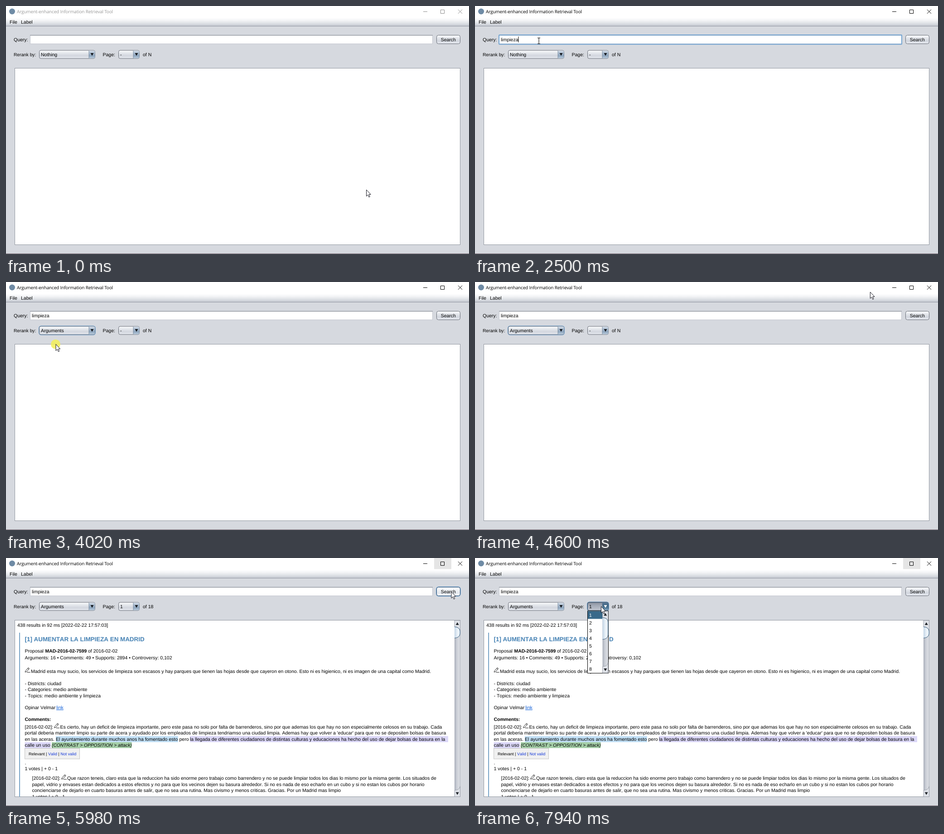
An HTML page for the animation above (8 s loop, 1022 px wide and 548 px high).

```html
<!DOCTYPE html>
<html lang="en">
<head>
<meta charset="utf-8">
<title>Retrieval tool</title>
<style>
html, body { margin: 0; width: 100%; height: 100%; overflow: hidden; background: #d6d9df; }
svg { display: block; width: 100vw; height: 100vh; }
text { font: 10.5px "Liberation Sans", Arial, sans-serif; font-kerning: none; text-rendering: geometricPrecision; white-space: pre; fill: #000; }
.title { font: 10px "Open Sans", "Noto Sans", sans-serif; letter-spacing: -.16px; }
.head { font-size: 13.4px; font-weight: bold; fill: #4682b4; }
.bold { font-weight: bold; }
.ital { font-style: italic; }
.small { font-size: 9px; }
.link { fill: #1160d8; text-decoration: underline; }
.act { fill: #1438d8; }
.inv { fill: #fff; }
.ring { fill: none; stroke: #73a4d1; stroke-width: 2; }
</style>
</head>
<body>
<svg id="stage" viewBox="0 0 1022 548" preserveAspectRatio="none"></svg>
<script>
const LOOP = 8000, QUERY = 'limpieza';
const KEYS = [1420, 1600, 1760, 1910, 2010, 2100, 2250, 2500];
const CLICKS = [[520, 620], [3270, 3400], [3970, 4080], [5090, 5180], [7820, 7940]];
const START = [795, 406];
const EDGE = '#686d77', EDGE_FOCUS = '#31506e';
// pointer strokes: start, end, control point, end point
const STROKES = [
  [40, 460, 420, 180, 141, 77],
  [2930, 3230, 140, 95, 130, 108],
  [3400, 3500, 129, 113, 126, 118],
  [3540, 3750, 121, 131, 109.5, 137.5],
  [4240, 4700, 560, 70, 970, 7],
  [4700, 4970, 1020, 36, 982.5, 74.5],
  [6870, 7350, 560, 140, 278, 107]
];

const txt = (x, y, s, a = '') => `<text x="${x}" y="${y}" ${a}>${s}</text>`;
const box = (x, y, w, h, fill, a = '') => `<rect x="${x}" y="${y}" width="${w}" height="${h}" fill="${fill}" ${a}/>`;
const path = (d, a) => `<path d="${d}" ${a}/>`;
const group = (id, s, a = '') => `<g id="${id}" ${a}>${s}</g>`;
const grad = (id, colors, across) => `<linearGradient id="${id}" x2="${across ? 1 : 0}" y2="${across ? 0 : 1}">` +
  colors.map((c, i) => `<stop offset="${i / (colors.length - 1)}" stop-color="${c}"/>`).join('') + '</linearGradient>';
const tri = (x, y, up, fill = '#1f2328') => path(`M${x - 3.5} ${y + (up ? 3 : -3)}h7l-3.5 ${up ? -6 : 6}z`, `fill="${fill}"`);
const ring = (id, x, y, w, h, r) => box(x, y, w, h, 'none', `id="${id}" class="ring" rx="${r}"`);
const pencil = (x, y) => path(`M${x + 2} ${y + 8.5}L${x + 8.3} ${y + 1.2}l2.3 2L${x + 4.6} ${y + 10.2}l-3.5 1zM${x + 7} ${y + 2.8}l2.3 2M${x + 5.2} ${y + 11.6}h7.3`,
  'fill="none" stroke="#222" stroke-width="1"');

function combo(id, x, w) {
  const face = (body, arrow, mark, edge) => {
    const r = x + w - 14;
    return box(x + .5, 98, w - 1, 18, `url(#${body})`, `rx="3.5" stroke="${edge}"`) +
      path(`M${r} 98.5h10.5q3 0 3 3v11q0 3-3 3H${r}z`, `fill="url(#${arrow})"`) +
      path(`M${r} 98.5v17`, 'stroke="#6c8196" stroke-width=".8"') +
      tri(x + w - 7, 107, false, mark);
  };
  return ring(id + 'Ring', x, 97.5, w, 19, 4.5) +
    face('face', 'arrow', '#15191e', EDGE) +
    group(id + 'Open', face('dark', 'arrowDark', '#fff', '#31465c')) +
    txt(x + 4, 111, '', `id="${id}Text"`);
}

function defs() {
  return '<defs>' +
    grad('face', ['#fbfcfd', '#e4e7ec', '#d2d6de', '#e9ecf2']) +
    grad('hover', ['#ffffff', '#f1f3f6', '#e4e8ee', '#fbfcff']) +
    grad('dark', ['#858d9b', '#a0a7b4', '#b0b6c2', '#c3c8d2']) +
    grad('arrow', ['#d5dee9', '#a9bbcf', '#8fa6be', '#b8cbdd']) +
    grad('arrowDark', ['#5d7c98', '#3f6584', '#507996', '#7fa3bf']) +
    grad('menu', ['#ffffff', '#f3f4f6', '#dfe2e7', '#c5c9d1']) +
    grad('track', ['#a9aeb9', '#c6cad3', '#d6d9df', '#d6d9df'], 1) +
    grad('thumb', ['#c3d5e6', '#dde8f2', '#f2f7fb', '#c9dae9'], 1) +
    `<clipPath id="pane">${box(20, 138, 970, 389.5, '#000')}</clipPath></defs>`;
}

function chrome() {
  return box(0, 0, 1022, 26, '#fff') +
    box(945, 0, 38, 24.5, '#e5e5e5', 'id="maxHover"') +
    '<circle cx="13.5" cy="12" r="6.5" fill="#6f8ba5"/>' +
    txt(24, 16, 'Argument-enhanced Information Retrieval Tool', 'id="title" class="title"') +
    group('winButtons', path('M921 12.5h9M959.5 8.5h8v8h-8zM998 7.8l9 9M1007 7.8l-9 9', 'fill="none" stroke-width="1"')) +
    box(0, 26, 1022, 18, 'url(#menu)') + box(0, 44, 1022, 1, '#9297a1') +
    txt(8, 39, 'File') + txt(33, 39, 'Label') +
    box(0, 547, 1022, 1, '#705e6b');
}

function form() {
  return txt(17, 78, 'Query:') +
    box(53.5, 64.5, 888, 19, '#fff', 'stroke="#c3c7cf"') +
    path('M53 64.5h889', 'stroke="#898e98"') + path('M54 65.5h887', 'stroke="#d8dade"') +
    ring('queryRing', 53, 64, 889, 20.5, 1) +
    txt(57, 78, '', 'id="query"') + box(57, 67.5, 1, 13, '#000', 'id="caret"') +
    ring('searchRing', 950, 64, 53, 20, 5) +
    box(950.5, 64.5, 52, 19, 'url(#face)', 'id="search" rx="4"') +
    txt(976.3, 78, 'Search', 'text-anchor="middle"') +
    txt(17, 111, 'Rerank by:', 'style="font-size:10.2px"') + combo('rank', 73, 124) +
    txt(213.5, 111, 'Page:') + combo('page', 248, 47) +
    txt(302, 111, '', 'id="total"') +
    box(19.5, 137.5, 983, 390, '#fff', 'stroke="#9297a1"');
}

function results() {
  const text =
    txt(25, 152, '438 results in 92 ms [2022-02-22 17:57:03]') +
    box(29, 165, 2, 363, '#7ba5c8') +
    txt(41.5, 184, '[1] AUMENTAR LA LIMPIEZA EN MADRID', 'class="head"') +
    txt(41.5, 209, 'Proposal') + txt(86.5, 209, 'MAD-2016-02-7599', 'class="bold" style="font-size:10.4px"') +
    txt(181, 209, 'of 2016-02-02') +
    txt(41.5, 224, 'Arguments: 16 • Comments: 49 • Supports: 2894 • Controversy: 0,102') +
    pencil(41, 241) +
    txt(55, 254, 'Madrid esta muy sucio, los servicios de limpieza son escasos y hay parques que tienen las hojas desde que cayeron en otono. Esto ni es higienico, ni es imagen de una capital como Madrid.') +
    txt(41.5, 281, '- Districts: ciudad') + txt(41.5, 294, '- Categories: medio ambiente') +
    txt(41.5, 308, '- Topics: medio ambiente y limpieza') +
    txt(41.5, 334, 'Opinar Velmar') + txt(111, 334, 'link', 'class="link"') +
    txt(41.5, 360, 'Comments:', 'class="bold"') +
    txt(41.5, 377, '[2016-02-02]:') + pencil(105.5, 364) +
    txt(119.5, 377, 'Es cierto, hay un deficit de limpieza importante, pero este pasa no solo por falta de barrenderos, sino por que ademas los que hay no son especialmente celosos en su trabajo. Cada') +
    txt(41.5, 390, 'portal deberia mantener limpio su parte de acera y ayudado por los empleados de limpieza tendriamso una ciudad limpia. Ademas hay que volver a \'educar\' para que no se depositen bolsas de basura') +
    box(110, 393.5, 270, 13.5, '#c2e0f6') + box(406, 393.5, 570, 13.5, '#dcd8f8') +
    box(41.5, 407, 57.5, 13, '#dcd8f8') + box(101, 407, 176.5, 13, '#a5cfa8') +
    txt(41.5, 404, 'en las aceras.') +
    txt(110, 404, 'El ayuntamiento durante muchos anos ha fomentado esto') + txt(382.5, 404, 'pero') +
    txt(406, 404, 'la llegada de diferentes ciudadanos de distintas culturas y educaciones ha hecho del uso de dejar bolsas de basura en la') +
    txt(41.5, 417, 'calle un uso') + txt(101, 417, '(CONTRAST &gt; OPPOSITION &gt; attack)', 'class="ital" style="font-size:10.2px"') +
    box(41.5, 420.5, 121, 23.5, '#f0f0f0', 'stroke="#c4c4c4"') +
    txt(50, 436, 'Relevant | <tspan class="act">Valid</tspan> | <tspan class="act">Not valid</tspan>', 'class="small"') +
    txt(41.5, 456, '.') + txt(41.5, 469, '1 votes | + 0 - 1') +
    txt(57.5, 490, '[2016-02-02]:') + pencil(121.5, 477.5) +
    txt(135, 490, 'Que razon teneis, claro esta que la reduccion ha sido enorme pero trabajo como barrendero y no se puede limpiar todos los dias lo mismo por la misma gente. Los situados de') +
    txt(57.5, 504, 'papel, vidrio y envases estan dedicados a estos efectos y no para que los vecinos dejen su basura alrededor. Si no es nada de eso echarlo en un cubo y si no estan los cubos por horario') +
    txt(57.5, 517, 'concienciarse de dejarlo en cuarto basuras antes de salir, que no sea una rutina. Mas civismo y menos criticas. Gracias. Por un Madrid mas limpio') +
    txt(57.5, 531, '1 votes | + 0 - 1');
  return group('results', `<g clip-path="url(#pane)">${text}</g>` + scrollbar(990, 138, 12.5, 389.5, 14, 177));
}

// the arrow buttons and the thumb meet along curves that bulge to the right
function scrollbar(x, y, w, h, btn, end) {
  const c = x + w / 2, r = x + w, top = y + btn, low = y + h - btn;
  const line = 'stroke="#8d929c" stroke-width=".8"';
  return box(x, y, w, h, 'url(#track)') +
    path(`M${x} ${y}H${r}V${top + 9}Q${r - 1} ${top + 1} ${x} ${top}z`, `fill="#dfe2e8" ${line}`) +
    path(`M${x} ${y + h}H${r}V${low - 9}Q${r - 1} ${low - 1} ${x} ${low}z`, `fill="#dfe2e8" ${line}`) +
    path(`M${x} ${top}Q${r - 1} ${top + 1} ${r} ${top + 10}V${end - 10}Q${r - 1} ${end - 1} ${x} ${end}z`, 'fill="url(#thumb)"') +
    path(`M${x} ${top}Q${r - 1} ${top + 1} ${r} ${top + 10}V${end - 10}Q${r - 1} ${end - 1} ${x} ${end}`, 'fill="none" stroke="#3f6383"') +
    tri(c, y + 7, true) + tri(c, y + h - 7, false);
}

function popups() {
  const rows = ['Nothing', 'Arguments', 'Controversy'];
  const pages = [1, 2, 3, 4, 5, 6, 7, 8];
  return group('rankList', box(73.5, 117, 122.5, 53, '#fff', 'stroke="#000"') +
      box(74, 117.5, 121.5, 17, '#39698a', 'id="pick"') +
      rows.map((s, i) => txt(77, 130 + i * 17, s, `id="row${i}"`)).join('')) +
    group('pageList', box(248.5, 117, 46, 137.5, '#fff', 'stroke="#000"') +
      box(249, 117.5, 32.5, 17, '#39698a') + scrollbar(281.5, 117.5, 12.5, 136.5, 14, 180) +
      pages.map((n, i) => txt(252, 130 + i * 17, n, i ? '' : 'class="inv"')).join(''));
}

function pointer() {
  return '<circle id="spot" r="10.5" fill="#f3ee58" opacity=".85"/>' +
    group('arrowCur', path('M.5 0V14.3L3.7 11.2L6 16.4L8.2 15.4L6 10.4H10.2Z', 'fill="#fff" stroke="#15151f" stroke-width="1" stroke-linejoin="round"')) +
    group('beamCur', path('M-3 -6.5h2.4l.6.6l.6-.6h2.4M0-6V6M-3 6.5h2.4l.6-.6l.6.6h2.4', 'fill="none" stroke="#111" stroke-width="1.1"'));
}

const $ = id => document.getElementById(id);
$('stage').innerHTML = defs() + box(0, 0, 1022, 548, '#d6d9df') + chrome() + form() + results() + popups() + pointer();

const show = (id, on) => $(id).setAttribute('visibility', on ? 'visible' : 'hidden');
const set = (id, name, v) => $(id).setAttribute(name, v);
const label = (id, s) => { if ($(id).textContent !== s) $(id).textContent = s; };
const within = (t, a, b) => t >= a && t < b;

function position(t) {
  let [x, y] = START;
  for (const [a, b, cx, cy, ex, ey] of STROKES) {
    if (t < a) break;
    const u = Math.min(1, (t - a) / (b - a)), s = u * u * (3 - 2 * u), r = 1 - s;
    x = r * r * x + 2 * r * s * cx + s * s * ex;
    y = r * r * y + 2 * r * s * cy + s * s * ey;
  }
  return [x, y];
}

function draw(t) {
  const [x, y] = position(t);
  const active = t >= 520, found = t >= 5980;
  const overField = x > 53 && x < 942 && y > 64 && y < 85;
  const overSearch = x > 950 && x < 1003 && y > 64 && y < 84;

  set('title', 'style', `fill:${active ? '#000' : '#999'}`);
  set('winButtons', 'stroke', active ? '#000' : '#8c8c8c');
  show('maxHover', t >= 4680);

  const typed = KEYS.filter(k => t >= k).length;
  label('query', QUERY.slice(0, typed));
  show('queryRing', within(t, 520, 3270));
  show('caret', within(t, 520, 1020) || within(t, 1420, 3000));
  set('caret', 'x', typed ? 56.8 + $('query').getComputedTextLength() : 57);

  const rankOpen = within(t, 3270, 3970), picked = y > 135 ? 1 : 0;
  show('rankRing', within(t, 3270, 5090));
  show('rankOpen', rankOpen);
  show('rankList', within(t, 3330, 3970));
  set('pick', 'y', 117.5 + picked * 17);
  for (let i = 0; i < 3; i++) set('row' + i, 'class', i === picked ? 'inv' : '');
  label('rankText', t < 3970 ? 'Nothing' : 'Arguments');

  const searchFocus = within(t, 5090, 7820), pressed = within(t, 5090, 5980);
  show('searchRing', searchFocus);
  set('search', 'fill', `url(#${pressed ? 'dark' : overSearch ? 'hover' : 'face'})`);
  set('search', 'stroke', searchFocus ? EDGE_FOCUS : EDGE);

  show('results', found);
  label('pageText', found ? '1' : '-');
  label('total', found ? 'of 18' : 'of N');
  show('pageRing', t >= 7820);
  show('pageOpen', t >= 7820);
  show('pageList', t >= 7880);

  show('spot', CLICKS.some(([a, b]) => within(t, a, b)));
  show('arrowCur', !overField);
  show('beamCur', overField);
  for (const id of ['spot', 'arrowCur', 'beamCur']) set(id, 'transform', `translate(${x} ${y})`);
}

const begin = performance.now();
function tick() {
  draw((performance.now() - begin) % LOOP);
  requestAnimationFrame(tick);
}
tick();
</script>
</body>
</html>
```
